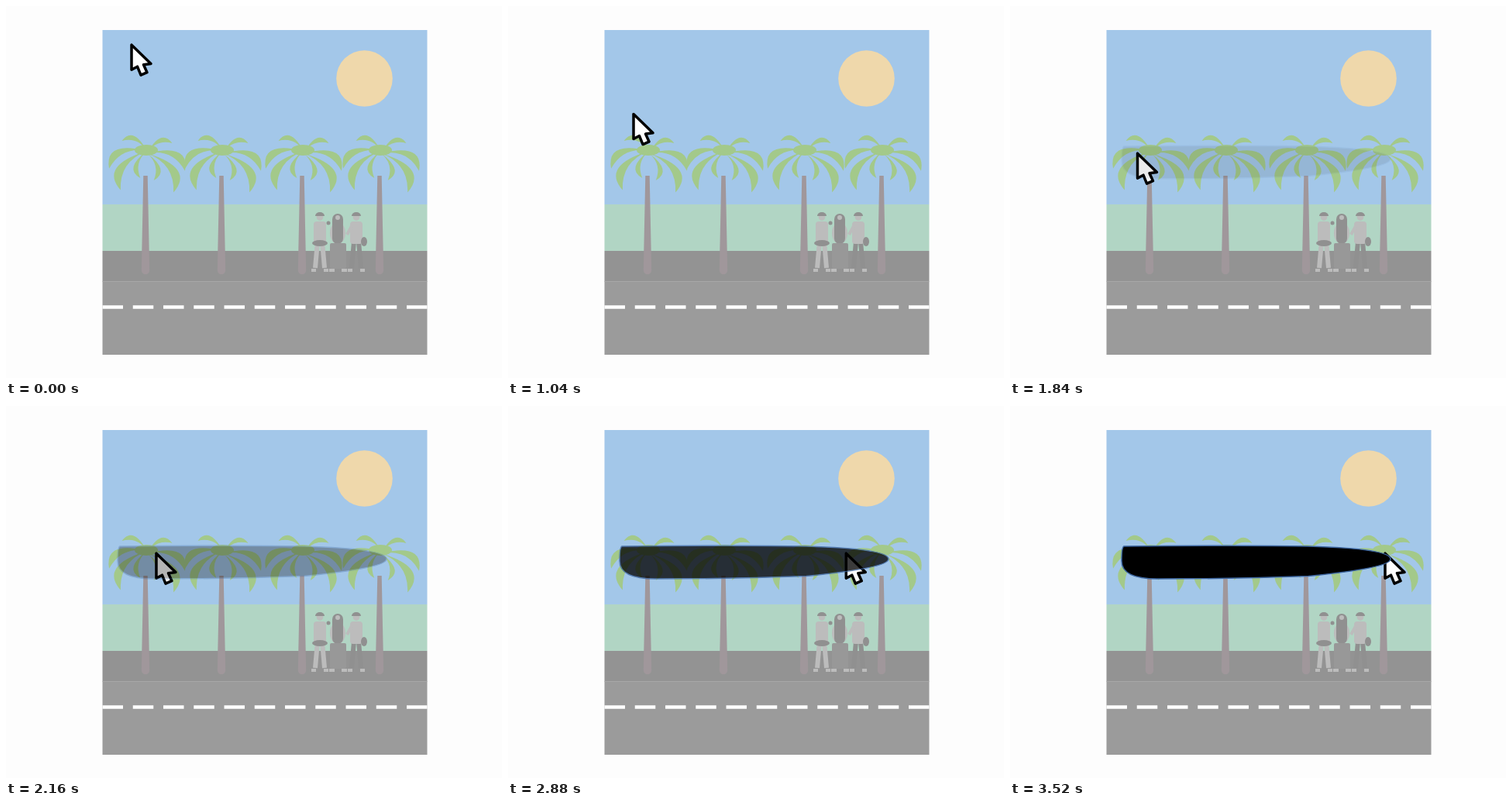
Recreate the animation shown at these times as an HTML page. Size 640 by 480 pixels, loop 4.32 s.

```html
<!DOCTYPE html>
<html lang="en">
<head>
<meta charset="utf-8">
<title>Drawing over a beach scene</title>
<style>
  html, body { margin: 0; width: 100%; height: 100%; overflow: hidden; background: #fdfdfd; }
  svg { display: block; width: 640px; height: 480px; }
  .light { fill: #bcbcbc; }
  .dark { fill: #909090; }
</style>
</head>
<body>
<svg viewBox="0 0 640 480">
  <defs>
    <g id="fronds"></g>
    <g id="palm">
      <path fill="#a0979b" d="M-4.7 219H.7L3.2 341a5.2 5.2 0 0 1-10.4 0Z"/>
      <g fill="#a3c98a" transform="translate(0 187)">
        <ellipse cx="-1" cy="-1" rx="15" ry="7"/>
        <use href="#fronds"/>
        <use href="#fronds" transform="translate(0 3) scale(-1 1)"/>
      </g>
    </g>
    <g id="person" class="light">
      <path d="M-3 304L-6 338M3 304L6 338" stroke="currentColor" stroke-width="6"/>
      <path d="M-11 341H-5M5 341H11" stroke="#bcbcbc" stroke-width="4"/>
      <rect x="-8" y="278" width="16" height="29" rx="4"/>
      <circle cy="272.5" r="4.3"/>
      <path class="dark" d="M-6 271a6 5 0 0 1 12 0Z"/>
    </g>
  </defs>

  <rect x="124.5" y="31" width="419" height="225" fill="#a3c7e9"/>
  <rect x="124.5" y="256" width="419" height="60" fill="#b1d5c4"/>
  <rect x="124.5" y="316" width="419" height="39" fill="#939393"/>
  <rect x="124.5" y="355" width="419" height="95" fill="#9b9b9b"/>
  <path d="M124.5 355.5H543.5" stroke="#a8a8a8"/>
  <path d="M124.5 388.5H543.5" stroke="#fdfdfd" stroke-width="4.6" stroke-dasharray="26.5 12.75"/>
  <circle cx="462.5" cy="93.5" r="36.3" fill="#efd8ab"/>

  <use href="#palm" x="182"/>
  <use href="#palm" x="280"/>
  <use href="#palm" x="384"/>
  <use href="#palm" x="484"/>

  <use href="#person" x="405" color="#bcbcbc"/>
  <ellipse class="dark" cx="405" cy="306" rx="10" ry="4"/>
  <circle class="dark" cx="416" cy="280" r="2.5"/>

  <ellipse class="light" cx="428" cy="293" rx="10" ry="14"/>
  <rect class="dark" x="421" y="268" width="14" height="39" rx="7"/>
  <circle class="light" cx="428" cy="273" r="3"/>
  <rect x="418" y="306" width="21" height="33" rx="2" fill="#989898"/>
  <path d="M417 341H424M433 341H440" stroke="#bcbcbc" stroke-width="4"/>

  <use href="#person" x="452" color="#909090"/>
  <path d="M446 284L440 295" stroke="#bcbcbc" stroke-width="4"/>
  <ellipse class="dark" cx="462" cy="304" rx="4" ry="6"/>

  <path id="cursor" fill="#fff" stroke="#000" stroke-width="3.5" stroke-linejoin="round"
        d="M0 0V32L7.5 28 12 39 20 35.5 15.5 25.5 25 24.3Z"/>
  <path id="blob" stroke="#3c659f" stroke-width="1.5"
        d="M147 181Q300 179.5 385 181Q491 184 491 197.5Q491 209 385 219.5Q290 223 190 223Q144 223 144 200Q144 182 147 181Z"/>
</svg>
<script>
  const byId = id => document.getElementById(id);
  const cursor = byId("cursor"), blob = byId("blob");

  // Point left of the crown, at an angle in degrees below the horizontal
  const polar = (angle, r) => {
    const a = angle * Math.PI / 180;
    return `${-r * Math.cos(a)} ${r * Math.sin(a)}`;
  };

  // A crescent that arches out and droops to its tip
  const frond = (angle, reach) =>
    `<path d="M0 0Q${polar(angle - 39, reach * 1.06)} ${polar(angle, reach)}` +
    `Q${polar(angle - 35, reach * 0.63)} 0 0Z"/>`;

  byId("fronds").innerHTML =
    frond(-22, 35) + frond(25, 54) + frond(56, 61) + frond(76, 36);

  const LOOP = 4320, STEP = 80, END = 3520;
  const progress = (t, from, to) => Math.min(1, Math.max(0, (t - from) / (to - from)));
  const ease = (p, power) => p < 0.5 ? (2 * p) ** power / 2 : 1 - (2 - 2 * p) ** power / 2;

  function draw(now) {
    const t = Math.min(END, Math.floor(now % LOOP / STEP) * STEP);
    const x = 162 + 322 * ease(progress(t, 1600, 3520), 3);
    const y = 50.2 + 140 * ease(progress(t, 0, 1900), 3.25);
    cursor.setAttribute("transform", `translate(${x} ${y})`);
    blob.setAttribute("opacity", progress(t, 1720, 3240));
  }

  const start = performance.now();
  function tick() {
    draw(performance.now() - start);
    requestAnimationFrame(tick);
  }
  tick();
</script>
</body>
</html>
```
